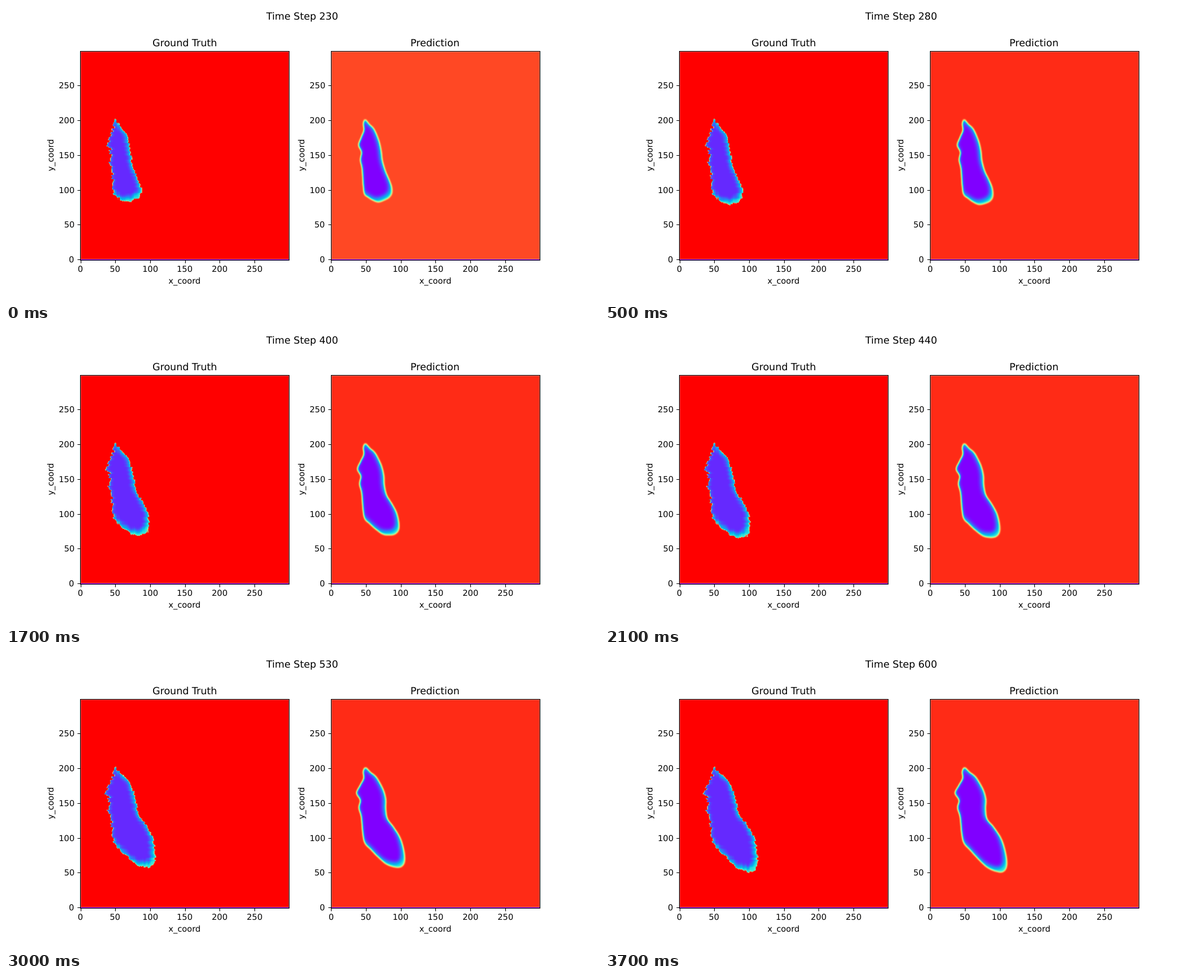
An HTML page with a canvas for the animation above (3.8 s loop, 1000x500 px).

```html
<!DOCTYPE html>
<html lang="en">
<head>
<meta charset="utf-8">
<style>
  html, body { margin: 0; width: 100%; height: 100%; overflow: hidden; background: #fff; }
  canvas, svg { position: absolute; left: 0; top: 0; width: 1000px; height: 500px; }
  text { font: 13.89px "DejaVu Sans", sans-serif; text-rendering: geometricPrecision; }
  .title { font-size: 16.67px; }
  .line { fill: none; stroke: #000; stroke-width: 1.11; }
</style>
</head>
<body>
<canvas id="plot" width="1000" height="500"></canvas>
<svg id="axes" viewBox="0 0 1000 500"></svg>
<script>
const N = 300, SIZE = 352.27, CELL = SIZE / N, LEFT = 125, TOP = 76.36;
const STEP_MS = 100, STEPS = 38;

// Burnt area at the first step: tip, down the right side, round the front, up the left side.
const outline = [
  [183, 192], [190, 200], [197, 207], [202, 217], [207, 231], [210, 246], [212, 262], [217, 279],
  [223, 293], [227, 304], [228, 313], [226, 320], [219, 326], [206, 331], [196, 328], [188, 323],
  [182, 318], [180, 304], [178, 275], [175, 260], [177, 247], [172, 235], [176, 223], [181, 210],
  [180, 199]];

const panels = [
  { title: "Ground Truth", x: 125, frame: 125.5, waist: 4, blur: 0.5, core: 0.95, rough: true,
    ground: () => 1 },
  { title: "Prediction", x: 547.73, frame: 548.5, waist: 15, blur: 0.9, core: 1, rough: false,
    ground: step => 0.946 - 0.037 * Math.max(0, 1 - step / 5) }];

const plot = document.getElementById("plot").getContext("2d");
const field = new OffscreenCanvas(N, N);
const mask = field.getContext("2d", { willReadFrequently: true });

let seed = 11;
const random = () => (seed = seed * 16807 % 2147483647) / 2147483647;
const jitter = amount => {
  const list = [];
  while (list.length < N) {
    const shift = Math.round((random() * 2 - 1) * amount);
    for (let run = 1 + random() * 2; run > 0; run--) list.push(shift);
  }
  return list;
};
const jagLeft = jitter(2.2), jagRight = jitter(1.4), jagDown = jitter(1.2);

function smoothstep(a, b, v) {
  const k = Math.min(1, Math.max(0, (v - a) / (b - a)));
  return k * k * (3 - 2 * k);
}

// The area grows away from the tip, fastest at the lower right.
function spread([x, y], p, waist) {
  const u = x - 180, v = (y - 192) / 135;
  const pinch = waist * u / 40 * Math.exp(-(((y - 282) / 26) ** 2));
  return [x + p * (u * (0.25 + 0.43 * v) - 6 * v * (1 - v) - pinch),
    y + p * u * 1.2 * smoothstep(0.75, 1.05, v)];
}

function rainbow(v) {
  return [Math.min(1, Math.abs(2 * v - 0.5)), Math.sin(Math.PI * v), Math.cos(Math.PI * v / 2)]
    .map(c => c * 255);
}

function smoothPath(pts) {
  const at = i => pts[(i + pts.length) % pts.length];
  const path = new Path2D();
  path.moveTo(...pts[0]);
  pts.forEach((b, i) => {
    const a = at(i - 1), c = at(i + 1), d = at(i + 2);
    path.bezierCurveTo(b[0] + (c[0] - a[0]) / 6, b[1] + (c[1] - a[1]) / 6,
      c[0] - (d[0] - b[0]) / 6, c[1] - (d[1] - b[1]) / 6, ...c);
  });
  return path;
}

// Alpha holds the burnt area, red its core, which lags behind the front.
function drawMask({ waist, blur }, step) {
  const path = smoothPath(outline.map(pt => spread(pt, step / (STEPS - 1), waist)));
  mask.setTransform(1, 0, 0, 1, 0, 0);
  mask.clearRect(0, 0, N, N);
  mask.setTransform(1 / CELL, 0, 0, 1 / CELL, -LEFT / CELL, -TOP / CELL);
  mask.filter = `blur(${blur}px)`;
  mask.fillStyle = "#000";
  mask.fill(path);

  mask.translate(130, 192);
  mask.scale(0.96, 0.96);
  mask.translate(-130, -192);
  mask.globalCompositeOperation = "source-atop";
  mask.filter = "blur(3px)";
  mask.fillStyle = "#fff";
  mask.fill(path);
  mask.globalCompositeOperation = "source-over";
  mask.filter = "none";
}

function drawPanel(panel, step) {
  drawMask(panel, step);
  const src = mask.getImageData(0, 0, N, N).data, out = new ImageData(N, N);
  const ground = panel.ground(step);
  const colors = Array.from({ length: 256 }, (_, i) => [...rainbow(ground * (1 - i / 255)), 255]);
  for (let y = 0; y < N; y++) for (let x = 0; x < N; x++) {
    let sx = x, sy = y;
    if (panel.rough) {
      sx += x < 52 ? jagLeft[y] : jagRight[y];
      sy += jagDown[x];
    }
    const i = (sy * N + sx) * 4, alpha = src[i + 3] || 0, red = src[i] || 0;
    const depth = alpha * (0.62 + (panel.core - 0.62) * red / 255);
    out.data.set(colors[Math.round(depth)], (y * N + x) * 4);
  }
  mask.putImageData(out, 0, 0);

  const x = panel.frame + 0.5;
  plot.save();
  plot.beginPath();
  plot.rect(x, 77, 351, 352);
  plot.clip();
  plot.drawImage(field, panel.x, TOP, SIZE, SIZE);
  plot.strokeStyle = "rgba(255,255,255,.3)";
  plot.strokeRect(x + 0.5, 77.5, 350, 350);
  plot.fillStyle = "#8000ff";
  plot.fillRect(x, 428, 351, 1);
  plot.restore();
}

const svg = document.getElementById("axes");

// Text starts on a whole pixel; align is the share of its width left of x.
function label(x, y, str, align = 0.5, cls = "") {
  svg.insertAdjacentHTML("beforeend", `<text y="${y}" class="${cls}">${str}</text>`);
  const text = svg.lastElementChild;
  text.setAttribute("x", Math.round(x - text.getComputedTextLength() * align));
  return text;
}

function drawAxes({ title, x, frame }) {
  const mid = x + SIZE / 2;
  let lines = `M${frame} 76.5h352v353h-352z`;
  label(mid, 68, title, 0.5, "title");
  label(mid, 469, "x_coord");
  label(0, 0, "y_coord").setAttribute("transform", `translate(${Math.round(x - 45)} 252) rotate(-90)`);
  for (let v = 0; v < N; v += 50) {
    const offset = (v + 0.5) * CELL;
    const tx = Math.round(x + offset) + 0.5, ty = Math.round(TOP + SIZE - offset) + 0.5;
    lines += `M${tx} 429.5v4.9M${frame} ${ty}h-4.9`;
    label(x + offset, 449, v);
    label(x - 9.7, ty + 4.5, v, 1);
  }
  svg.insertAdjacentHTML("beforeend", `<path class="line" d="${lines}"/>`);
}

panels.forEach(drawAxes);
const clock = label(500, 23, "Time Step 230", 0.5, "title");

let shown = -1;
const start = performance.now();
function tick() {
  const step = Math.floor((performance.now() - start) / STEP_MS) % STEPS;
  if (step !== shown) {
    shown = step;
    clock.textContent = `Time Step ${230 + step * 10}`;
    plot.clearRect(0, 0, 1000, 500);
    panels.forEach(panel => drawPanel(panel, step));
  }
  requestAnimationFrame(tick);
}
tick();
</script>
</body>
</html>
```
